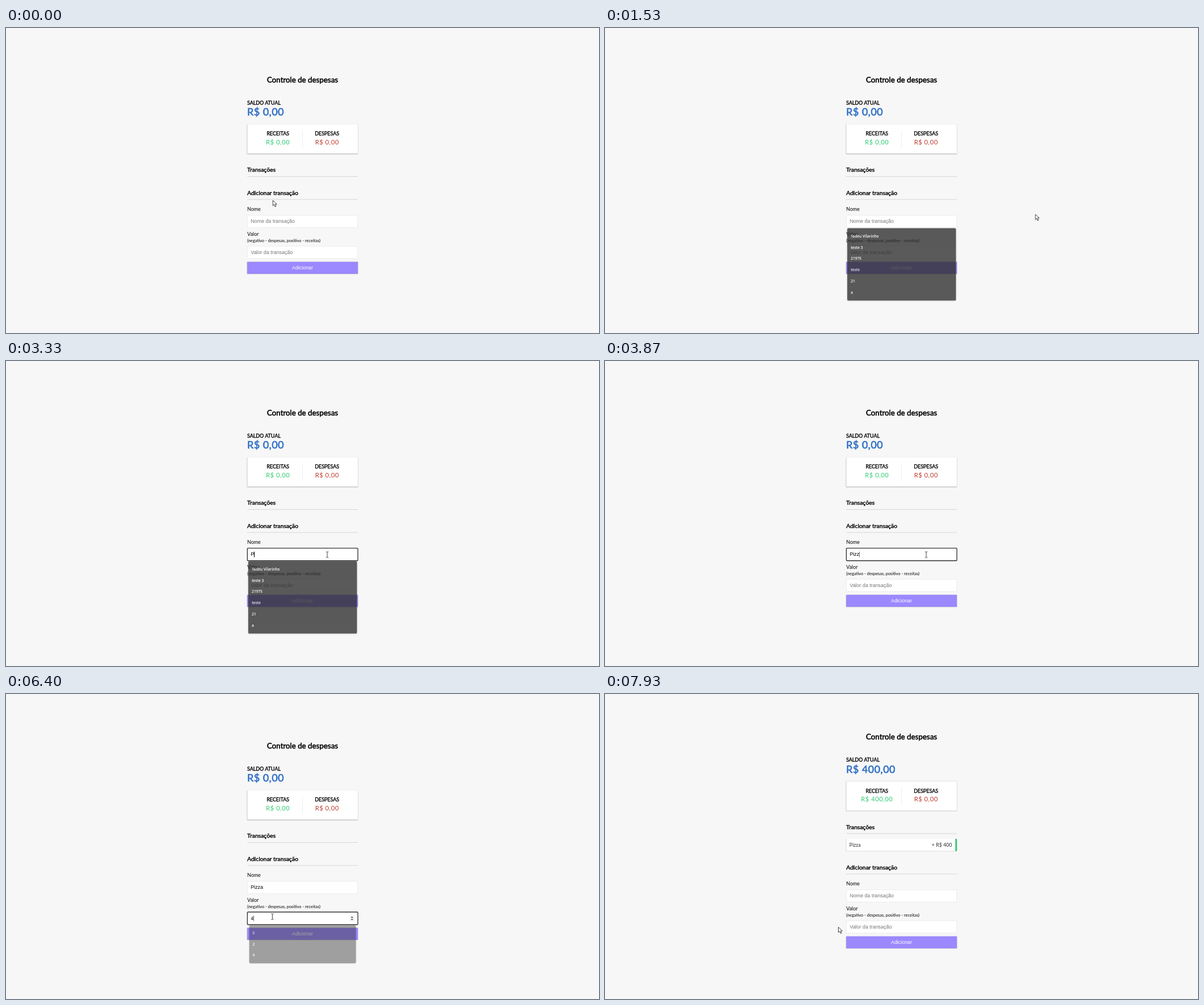
These frames come from a looping animation (1043 px wide and 537 px high, 8 s). An HTML page:

```html
<!DOCTYPE html>
<html lang="pt-BR">
<head>
<meta charset="utf-8">
<title>Controle de despesas</title>
<style>
  html, body { margin: 0; width: 100%; height: 100%; overflow: hidden; background: #f7f7f7; }
  * { box-sizing: border-box; }
  #page {
    position: absolute; left: 0; top: 0; width: 1877.4px; height: 966.6px;
    transform: scale(.55556); transform-origin: 0 0;
    display: flex; flex-direction: column; align-items: center; justify-content: center;
    font: 16px/19px Lato, sans-serif; color: #000;
  }
  h1, h2, h3, h4 { font-weight: 400; -webkit-text-stroke: .04em; margin: 0; }
  h2 { font-size: 24px; line-height: 29px; margin: 19.92px 0; }
  h4 { font-size: 16px; text-transform: uppercase; }
  h1 { font-size: 32px; line-height: 39px; letter-spacing: 1px; color: #3272c6; }
  h3 { font-size: 18.72px; line-height: 22px; border-bottom: 1px solid #bbb; padding-bottom: 10px; margin: 40px 0 10px; }
  .container { width: 350px; margin: 30px 0; }
  .card, .item, .btn { box-shadow: 0 1px 3px rgba(0,0,0,.12), 0 1px 2px rgba(0,0,0,.24); }
  .card { background: #fff; padding: 20px; margin: 20px 0; display: flex; }
  .card > div { flex: 1; text-align: center; }
  .card > div:first-child { border-right: 1px solid #dedede; }
  .money { font-size: 20px; line-height: 24px; letter-spacing: 1px; margin: 5px 0; }
  .plus { color: #2ecc71; }
  .minus { color: #c0392b; }
  .list { margin: 16px 0 40px; }
  .item {
    background: #fff; color: #333; display: flex; justify-content: space-between;
    padding: 10px; border-right: 5px solid #2ecc71;
  }
  .control { position: relative; }
  label { display: inline-block; margin: 10px 0; vertical-align: top; }
  small { font-size: 13.333px; line-height: 1; }
  .field, .btn { font: 16px/18px "Liberation Sans", Arial, sans-serif; padding: 10px; }
  .field { position: relative; height: 40px; background: #fff; border: 1px solid #dedede; border-radius: 2px; white-space: pre; }
  .field.focus { outline: 2px solid #101010; outline-offset: -1px; }
  .hint { color: #757575; }
  .caret { display: inline-block; width: 1.4px; height: 18px; margin-right: -1.4px; background: #000; vertical-align: top; }
  .spin { position: absolute; right: 10px; top: 10px; width: 15px; height: 18px; background: #efefef; }
  .btn { background: #9c88ff; color: #fff; text-align: center; margin: 10px 0 30px; }
  .popup {
    position: absolute; left: 1px; top: 100%; width: 348px; padding: 8px 11px; z-index: 1;
    background: #2d2d2d; color: #fff; border-radius: 4px; box-shadow: 0 1px 4px rgba(0,0,0,.4);
    font: 600 12px/36px "Open Sans", "Noto Sans", sans-serif;
  }
  #cursor { position: absolute; left: 0; top: 0; overflow: visible; z-index: 2; }
</style>
</head>
<body>
<div id="page">
  <h2>Controle de despesas</h2>
  <div class="container">
    <h4>Saldo atual</h4>
    <h1 id="balance"></h1>
    <div class="card">
      <div><h4>Receitas</h4><div class="money plus" id="income"></div></div>
      <div><h4>Despesas</h4><div class="money minus">R$ 0,00</div></div>
    </div>
    <h3>Transações</h3>
    <div class="list"><div class="item" id="item"><span>Pizza</span><span>+ R$ 400</span></div></div>
    <h3>Adicionar transação</h3>
    <div class="control">
      <label>Nome</label>
      <div class="field" id="name"></div>
      <div class="popup" id="namePopup"></div>
    </div>
    <div class="control">
      <label>Valor<br><small>(negativo - despesas, positivo - receitas)</small></label>
      <div class="field" id="value"></div>
      <div class="popup" id="valuePopup"></div>
    </div>
    <div class="btn">Adicionar</div>
  </div>
  <svg id="cursor" width="1" height="1">
    <g id="arrow"><path d="M0 0V17l4-4 3 7 3-1.3-3-6.7h5.5z" fill="#fff" stroke="#000" stroke-width="1.3"/></g>
    <g id="beam"><path d="M-4-9h3l1 1 1-1h3M0-8V8M-4 9h3l1-1 1 1h3" fill="none" stroke="#222" stroke-width="1.5"/></g>
    <g id="hand"><path d="M-1.5 1.5q0-2 1.8-2t1.8 2V8q2-1.500 3.400.300 2-1 3.200.600 2.800-.600 2.800 2V15q0 3-2 6H1Q-1 17-5.500 13.500q-.500-2.500 2-2l2 1.500z" fill="#fff" stroke="#000" stroke-width="1.300"/></g>
  </svg>
</div>
<script>
const $ = id => document.getElementById(id);
const SCALE = 5 / 9, RATE = 15, STEPS = 120, SUBMIT = 112;

// step, x, y of the pointer's hot spot
const path = [
  [0, 469.5, 303.5], [2, 466.5, 318], [4, 471.5, 340], [13, 471.5, 340],
  [15, 500.5, 341.5], [17, 500.5, 341.5], [22, 757, 328], [26, 757, 328],
  [30, 565, 341], [61, 565, 341], [65, 638, 360], [72, 468.5, 392],
  [105, 468.5, 392], [110, 480, 427], [113, 480, 427], [118, 431, 416], [119, 410.5, 410.5]
];
const nameKeys = [49, 52, 55, 58, 61];
const valueKeys = [94, 98, 101];

$('namePopup').innerHTML = rows(['Tadeu Vilarinho', 'teste 3', '21975', 'teste', '21', 'a']);
$('valuePopup').innerHTML = rows(['8', '2', '4']);

function rows(items) {
  return items.map(text => `<div>${text}</div>`).join('');
}

function pointer(step) {
  const i = Math.max(1, path.findIndex(p => p[0] >= step));
  const [s0, x0, y0] = path[i - 1], [s1, x1, y1] = path[i];
  const k = (step - s0) / (s1 - s0);
  return [x0 + (x1 - x0) * k, y0 + (y1 - y0) * k];
}

function pointerKind(x, y, shift) {
  const within = (top, bottom) => x > 424 && x < 619 && y > top + shift && y < bottom + shift;
  if (within(329, 352) || within(384, 406)) return 'beam';
  return within(411, 433) ? 'hand' : 'arrow';
}

function typed(word, keys, step) {
  return step < SUBMIT ? word.slice(0, keys.filter(k => k <= step).length) : '';
}

function drawField(id, text, hint, focus, marks, step, extra) {
  const last = Math.max(...marks.filter(m => m <= step), 0);
  const caret = focus && (step < 23 || (step - last) % 16 < 8) ? '<span class="caret"></span>' : '';
  const body = text ? text + caret : `${caret}<span class="hint">${hint}</span>`;
  $(id).className = focus ? 'field focus' : 'field';
  $(id).innerHTML = body + extra;
}

function drawPopup(id, spans, step) {
  let alpha = 0;
  for (const [open, close] of spans) {
    if (step >= open) alpha = step < close ? 1 : [.78, .43, .13][step - close] || 0;
  }
  $(id).style.opacity = alpha;
  $(id).style.transform = `scale(${1 - .052 * (1 - alpha)})`;
}

const spinner = '<svg class="spin" viewBox="0 0 15 18"><path d="M4 7l3.500-4L11 7zM4 11l3.500 4 3.500-4z" fill="#444"/></svg>';

function draw(step) {
  const done = step >= SUBMIT;
  $('balance').textContent = $('income').textContent = done ? 'R$ 400,00' : 'R$ 0,00';
  $('item').style.display = done ? '' : 'none';

  const nameFocus = (step >= 8 && step < 22) || (step >= 35 && step < 73);
  const valueFocus = step >= 73 && !done;
  drawField('name', typed('Pizza', nameKeys, step), 'Nome da transação',
    nameFocus, [8, 35, ...nameKeys], step, '');
  drawField('value', typed('400', valueKeys, step), 'Valor da transação',
    valueFocus, [73, ...valueKeys], step, valueFocus ? spinner : '');
  drawPopup('namePopup', [[9, 23], [35, 50]], step);
  drawPopup('valuePopup', [[73, 95]], step);

  const [x, y] = pointer(step);
  const kind = pointerKind(x, y, done ? 15.3 : 0);
  for (const id of ['arrow', 'beam', 'hand']) $(id).style.display = id === kind ? '' : 'none';
  $('cursor').style.transform = `translate(${x / SCALE}px, ${y / SCALE}px)`;
}

let shown = -1;
const start = performance.now();
function tick() {
  const ms = (performance.now() - start) % 8000;
  const step = Math.min(STEPS - 1, Math.floor((ms + 4) * RATE / 1000));
  if (step !== shown) draw(shown = step);
  requestAnimationFrame(tick);
}
tick();
</script>
</body>
</html>
```
